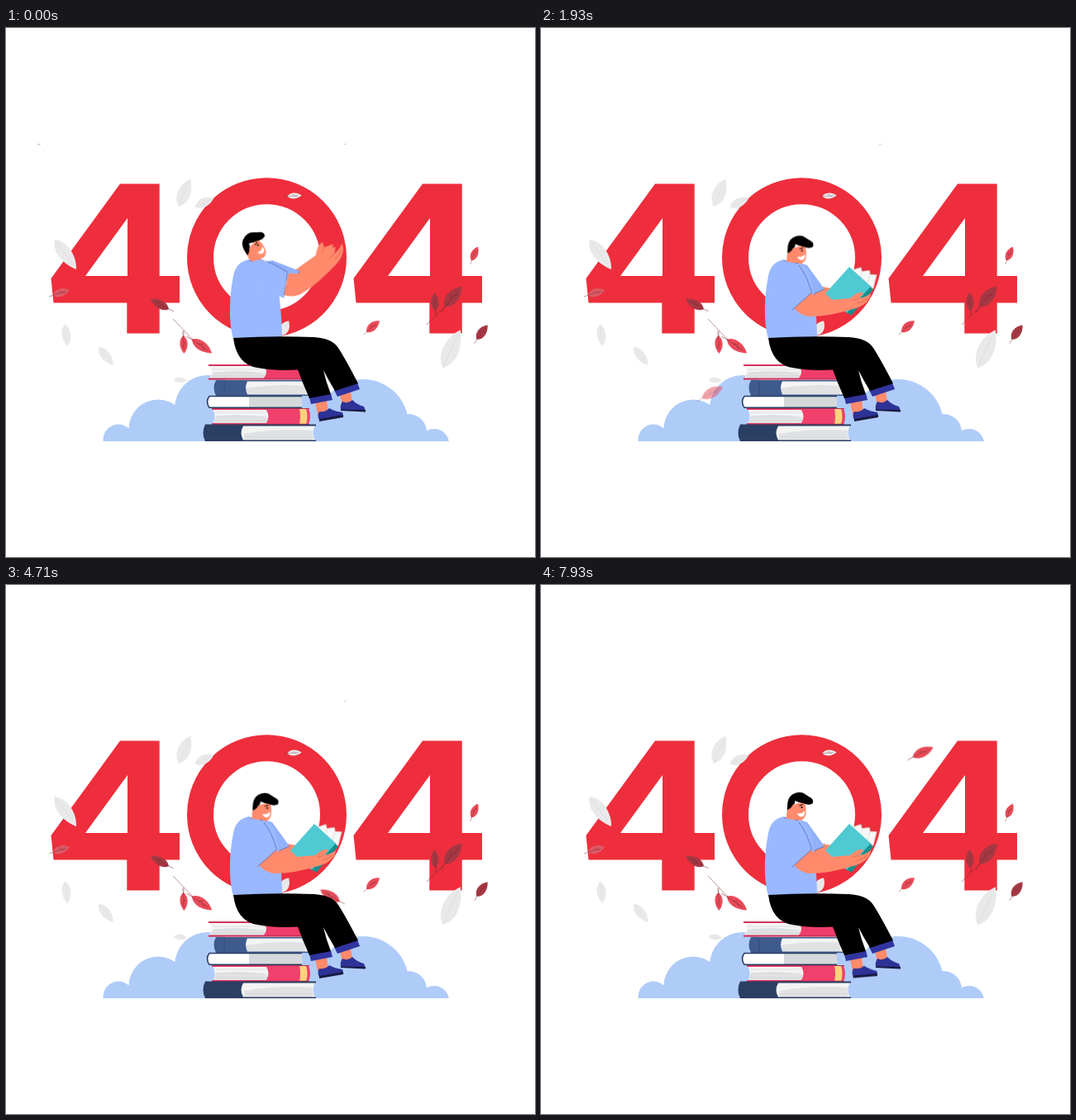
Recreate the animation shown at these times as an HTML page without scripts. Size 640 by 640 pixels, loop 8000 ms.

```html
<!DOCTYPE html>
<html lang="en">
<head>
<meta charset="utf-8">
<title>404</title>
<style>
html, body { margin: 0; width: 100%; height: 100%; overflow: hidden; background: #fff; }
svg { display: block; width: 100vw; height: 100vh; }
.move { animation: 8s linear infinite; }
.red { color: #ea4a58; }
.dark { color: #a63843; }
.grey { color: #e9e9ea; }
.vein { fill: none; stroke: #7d2c38; stroke-width: .5; }
.skin { fill: #ff8a6c; }
.shirt { fill: #9ab8ff; }
.shoe { fill: #2d3296; }
.seam { fill: none; stroke: #4c64aa; stroke-width: .7; }
.crease { fill: none; stroke: #d9604a; stroke-width: .7; }
.page { fill: #f4f4f4; }
.shade { fill: #e0e2e4; }
.lines { stroke: #cdd0d3; stroke-width: .6; }

#drop1 { animation-name: drop1; }
@keyframes drop1 {
  0% { transform: translate(58px, 132px) rotate(-22deg); }
  5% { transform: translate(95px, 200px) rotate(-22deg); }
  10.75% { transform: translate(144px, 296px) rotate(-34deg); }
  17.9% { transform: translate(163px, 390px) rotate(-40deg); }
  21.5% { transform: translate(194px, 428px) rotate(-32deg); opacity: 1; }
  27%, 100% { transform: translate(222px, 455px) rotate(-24deg); opacity: 0; }
}
#drop2 { animation-name: drop2; }
@keyframes drop2 {
  0%, 26% { transform: translate(300px, 112px) rotate(155deg); }
  32.1% { transform: translate(237px, 197px) rotate(160deg); }
  43.75% { transform: translate(91px, 377px) rotate(163deg); }
  47% { transform: translate(78px, 405px) rotate(150deg); opacity: 1; }
  54.5%, 100% { transform: translate(185px, 445px) rotate(120deg); opacity: 0; }
}
#drop3 { animation-name: drop3; }
@keyframes drop3 {
  0%, 33% { transform: translate(510px, 116px) rotate(205deg); }
  43.75% { transform: translate(273px, 214px) rotate(198deg); }
  47% { transform: translate(280px, 250px) rotate(200deg); }
  58.9% { transform: translate(392px, 376px) rotate(212deg); opacity: 1; }
  63%, 100% { transform: translate(386px, 405px) rotate(216deg); opacity: 0; }
}
#drop4 { animation-name: drop4; }
@keyframes drop4 {
  0%, 66% { transform: translate(592px, 112px) rotate(200deg); }
  75.5% { transform: translate(520px, 266px) rotate(205deg); }
  84.9% { transform: translate(398px, 355px) rotate(213deg); opacity: 1; }
  91%, 100% { transform: translate(374px, 398px) rotate(216deg); opacity: 0; }
}
#drop5 { animation-name: drop5; }
@keyframes drop5 {
  0%, 87% { transform: translate(428px, 132px) rotate(-22deg); }
  99.1% { transform: translate(462px, 202px) rotate(-25deg); }
  100% { transform: translate(464px, 208px) rotate(-25deg); }
}

#book { animation-name: book; }
@keyframes book {
  0%, 4% { transform: translate(346px, 76px) rotate(-25deg); }
  10.75% { transform: translate(348px, 160px) rotate(-17deg); }
  17.9% { transform: translate(351.5px, 226px) rotate(-6.5deg); }
  24%, 100% { transform: translate(373px, 289px) rotate(42deg); }
}
#head { animation-name: head; transform-origin: 302px 282px; }
@keyframes head {
  0% { transform: translate(-1px, -1px) rotate(-34deg); animation-timing-function: ease-in-out; }
  15%, 100% { transform: none; }
}
#near { animation-name: near; transform-origin: 300px 290px; }
@keyframes near {
  0% { transform: rotate(-40deg); }
  17.9% { transform: rotate(-15deg); }
  24%, 100% { transform: none; }
}
#nearFore { animation-name: nearFore; transform-origin: 314px 336px; }
@keyframes nearFore {
  0% { transform: rotate(10deg); }
  17.9% { transform: rotate(-7deg); }
  24%, 100% { transform: none; }
}
#far { animation-name: far; transform-origin: 312px 284px; }
@keyframes far {
  0% { transform: rotate(-33deg); }
  17.9% { transform: rotate(-7deg); }
  24%, 100% { transform: none; }
}
#farFore { animation-name: farFore; transform-origin: 336px 320px; }
@keyframes farFore {
  0% { transform: rotate(-14deg); }
  17.9% { transform: rotate(-24deg); }
  24%, 100% { transform: none; }
}
/* head and foot keep time while he reads */
#foot, #nod { animation: 8s ease-in-out infinite; }
#foot { animation-name: foot; transform-origin: 384px 458px; }
@keyframes foot {
  0%, 17.9%, 29.9%, 57.6%, 85.3% { transform: none; }
  43.75%, 71.4%, 99.1%, 100% { transform: rotate(5deg); }
}
#nod { animation-name: nod; }
@keyframes nod {
  0%, 17.9% { transform: none; }
  29.9%, 57.6%, 85.3% { transform: translate(.5px, .8px); }
  43.75%, 71.4%, 99.1%, 100% { transform: none; }
}
</style>
</head>
<body>
<svg viewBox="0 0 640 640">
  <defs>
    <clipPath id="scene"><rect y="140" width="640" height="360"/></clipPath>
    <path id="four" fill-rule="evenodd" d="M138 188.500H185.700V300H210V332.500H185.700V369.500H146.300V332.500H57.500L54.500 303ZM147 230L96 300H147Z"/>
    <path id="blade" fill="currentColor" d="M-12 0C-7 -7.500 4 -8 12 0C4 7 -7 8 -12 0Z"/>
    <g id="plain">
      <use href="#blade"/>
      <path d="M-12 0H8" stroke="#dedee0" stroke-width=".5"/>
    </g>
    <g id="leaf">
      <use href="#blade"/>
      <path class="vein" d="M-18 1Q-12 0 7 0M-4 0L0 -3M0 0L4 2"/>
    </g>
  </defs>

  <g clip-path="url(#scene)">
    <g fill="#afccf9">
      <circle cx="136" cy="498" r="18.500"/>
      <circle cx="184" cy="485" r="35.500"/>
      <circle cx="244" cy="460" r="40"/>
      <circle cx="432" cy="480" r="55"/>
      <circle cx="487" cy="489" r="22"/>
      <circle cx="518" cy="503" r="18"/>
      <path d="M136 500V484H205V455H244V430H360L385 455L432 470H487V490H518V500Z"/>
    </g>

    <g fill="#ee2e3c">
      <use href="#four"/>
      <use href="#four" x="366"/>
    </g>
    <circle cx="315.500" cy="277.700" r="80.500" fill="none" stroke="#ee2e3c" stroke-width="32"/>

    <g class="grey">
      <use href="#plain" transform="translate(216 199) rotate(-67) scale(1.500 1.350)"/>
      <use href="#plain" transform="translate(240 211) rotate(-25) scale(1.050 .95)"/>
      <use href="#plain" transform="translate(72 274) rotate(54) scale(1.850 1.400)"/>
      <use href="#plain" transform="translate(73 372) rotate(84) scale(1.120 .95)"/>
      <use href="#plain" transform="translate(121 397) rotate(52) scale(1.170 .95)"/>
      <use href="#plain" transform="translate(539 388) rotate(-65) scale(2.100 1.700)"/>
      <use href="#plain" transform="translate(211 426) rotate(5) scale(.68 .6)"/>
      <use href="#plain" transform="translate(337 363) rotate(-60) scale(.85 1)"/>
      <use href="#leaf" transform="translate(349 203) rotate(-3) scale(.72 .6)"/>
    </g>
    <g class="red">
      <use href="#leaf" transform="translate(67 320) rotate(-16) scale(.88 .85)" color="#dd5a66"/>
      <use href="#leaf" transform="translate(237 385) rotate(35) scale(1.220 1)"/>
      <use href="#leaf" transform="translate(215 383) rotate(88) scale(.92 .8)"/>
      <use href="#leaf" transform="translate(567 273) rotate(-65) scale(.78 .75)"/>
      <use href="#leaf" transform="translate(444 361) rotate(-40) scale(.86 .85)"/>
      <path class="vein" d="M202 352L226 377M215 366V374"/>
    </g>
    <g class="dark">
      <use href="#leaf" transform="translate(186 334) rotate(210) scale(1.050 .9)"/>
      <use href="#leaf" transform="translate(541 325) rotate(-49) scale(1.350 1.250)"/>
      <use href="#leaf" transform="translate(519 331) rotate(-92) scale(.92 .85)"/>
      <use href="#leaf" transform="translate(576 368) rotate(-53) scale(.92 .9)"/>
      <path class="vein" d="M509 359L534 334M520 348V340"/>
    </g>

    <g class="red">
      <g id="drop1" class="move"><use href="#leaf" transform="scale(1.200 1.050)"/></g>
      <g id="drop2" class="move"><use href="#leaf" transform="scale(1.150 1)"/></g>
      <g id="drop3" class="move" color="#e2505d"><use href="#leaf" transform="scale(1.150 1)"/></g>
      <g id="drop4" class="move"><use href="#leaf" transform="scale(1.150 1)"/></g>
      <g id="drop5" class="move"><use href="#leaf" transform="scale(1.150 1)"/></g>
    </g>

    <!-- book stack -->
    <path class="page" d="M246 409H320V424H246Q251 416 246 409Z"/>
    <path class="shade" d="M250 417Q285 412 314 419V424H247Z"/>
    <path class="lines" d="M250 413H314M251 417H314M250 421H314"/>
    <path d="M245 407H366V425.500H245V423.500H312Q318 416 312 409H245Z" fill="#ee3d69"/>
    <path d="M245 408H366M245 424.700H366" stroke="#b92e52" stroke-width="1.200"/>

    <path class="page" d="M285 427H366Q361 435 366 444H285Z"/>
    <path class="shade" d="M290 436Q325 430 362 433V444H290Z"/>
    <path d="M254 426H366V427.500H292Q288 435 292 443.500H366V445H254Q249 435 254 426Z" fill="#3f5b8d"/>
    <path d="M264 427V444" stroke="#334c79"/>

    <path d="M246 445.500H358V459.500H246Q241 452 246 445.500Z" fill="#fff"/>
    <path d="M294 446H358V459H294Z" fill="#d6d9db"/>
    <path d="M358 445.500H246Q241 452 246 459.300H358" fill="none" stroke="#2b3f63" stroke-width="1.600"/>

    <path class="page" d="M250 461H320V479H250Q255 470 250 461Z"/>
    <path class="shade" d="M253 470Q285 465 317 472V479H251Z"/>
    <path class="lines" d="M254 465H316M254 470H316M254 475H316"/>
    <path d="M249 460H366Q370 470 366 480H249V478H315Q320 470 315 462H249Z" fill="#f0416c"/>
    <path d="M355 460.500H363Q366 470 363 479.500H355Q357 470 355 460.500Z" fill="#fbd37c"/>
    <path d="M249 460.500H367M249 479.300H367" stroke="#b92e52" stroke-width="1.200"/>

    <path class="page" d="M280 481H374Q369 490 374 499H280Z"/>
    <path class="shade" d="M288 491Q330 484 371 487V499H288Z"/>
    <path class="lines" d="M290 495H372"/>
    <path d="M241 479.500H375V481.500H287Q282 490 287 498.500H375V500H241Q236 490 241 479.500Z" fill="#2b3f63"/>

    <!-- far arm -->
    <g id="far" class="move">
      <g id="farFore" class="move">
        <path class="skin" d="M327 322L341 313L371 319Q381 312 388 314L385 320L395 325Q386 332 374 331L338 331Z"/>
        <path class="crease" d="M376 323L385 320"/>
      </g>
      <path d="M306 282L322 287L343 316L327 323L312 304Z" fill="#91b1fb"/>
      <path class="seam" d="M343 316L327 323"/>
    </g>

    <!-- feet and legs -->
    <path class="skin" d="M404 443L417 440L420 456L407 457Z"/>
    <path class="shoe" d="M407 452Q414 455 419 450Q425 456 433 458L435 463L405 462Q404 456 407 452Z"/>
    <path d="M405 461.500L435 462V464.500L405 463Z" fill="#17193f"/>
    <path class="skin" d="M374 453L388 450L390 465L377 467Z"/>
    <g id="foot">
      <path class="shoe" d="M379 464Q387 465 391 460Q398 464 407 465L408 469L379 474Q376 469 379 464Z"/>
      <path d="M379 473L408 468V471L379 476Z" fill="#17193f"/>
    </g>
    <path d="M397 438L425 429L428 437L401 446ZM367 447L393 442L395 450L369 455Z" fill="#3035a0"/>

    <g id="nod">
      <g id="head" class="move">
        <path class="skin" d="M298 268L318 262Q321 267 320.500 273Q321 281 315.500 284.500Q312 286 309 284L308 290H294L297 279Z"/>
        <path d="M298 272Q297 258 304 253.500Q310 249.500 317 251.500Q321 254 324 256Q331 259 328.500 264.500Q324 267 317 264Q311 263 307.500 261Q307 266 304.500 266Q303 270 298 272Z"/>
        <path d="M309.500 276Q315 277.500 319 273.500Q320 280 314 280.500Q311 279.500 309.500 276Z" fill="#fff"/>
        <circle cx="315.500" cy="269" r="1"/>
        <path d="M312.500 267L317 265.500" stroke="#000"/>
      </g>
    </g>

    <path class="shirt" d="M294 280Q278 283 275 300Q270 325 271 350Q272 366 275 376H334Q334 350 330 320L326 298Q323 289 310 284Q301 286 294 280Z"/>
    <path class="seam" d="M294 281Q301 287 311 284.500"/>
    <path d="M275 375Q325 372 372 374Q394 375 402 387Q411 401 426 430L398 439Q390 426 384 414Q387 428 393 443L367 448Q359 430 353 413.500Q325 415 304 411Q279 407 275 375Z"/>

    <g id="book" class="move">
      <path d="M5 1L11 -9L15 -6L21 -13L25 -10L31 -15L39 0L35 3Z" fill="#f7f7f7" stroke="#d5d7d9" stroke-width=".7"/>
      <path d="M15 -6L20 1M25 -10L30 1" stroke="#cfd1d3" stroke-width=".7"/>
      <path d="M34 0L40 1.500L41 42L34 43.500Z" fill="#12918f"/>
      <path d="M0 0H35V43.500H0Z" fill="#4fc9d2"/>
    </g>

    <!-- near arm -->
    <g id="near" class="move">
      <g id="nearFore" class="move">
        <path class="skin" d="M306 339L326 320Q335 329 350 329L374 327Q384 318 390 320Q389 324 384 327Q393 326 399 321Q398 333 381 339Q350 349 324 349Q313 347 306 339Z"/>
        <path class="crease" d="M377 329Q381 329 384 327M382 333Q390 332 395 327"/>
      </g>
      <path class="shirt" d="M294 284Q302 281 312 287L327.500 320L304 341L288 312Z"/>
      <path class="seam" d="M312 287Q322 300 327.500 320L304 341"/>
    </g>
  </g>
</svg>
</body>
</html>
```
